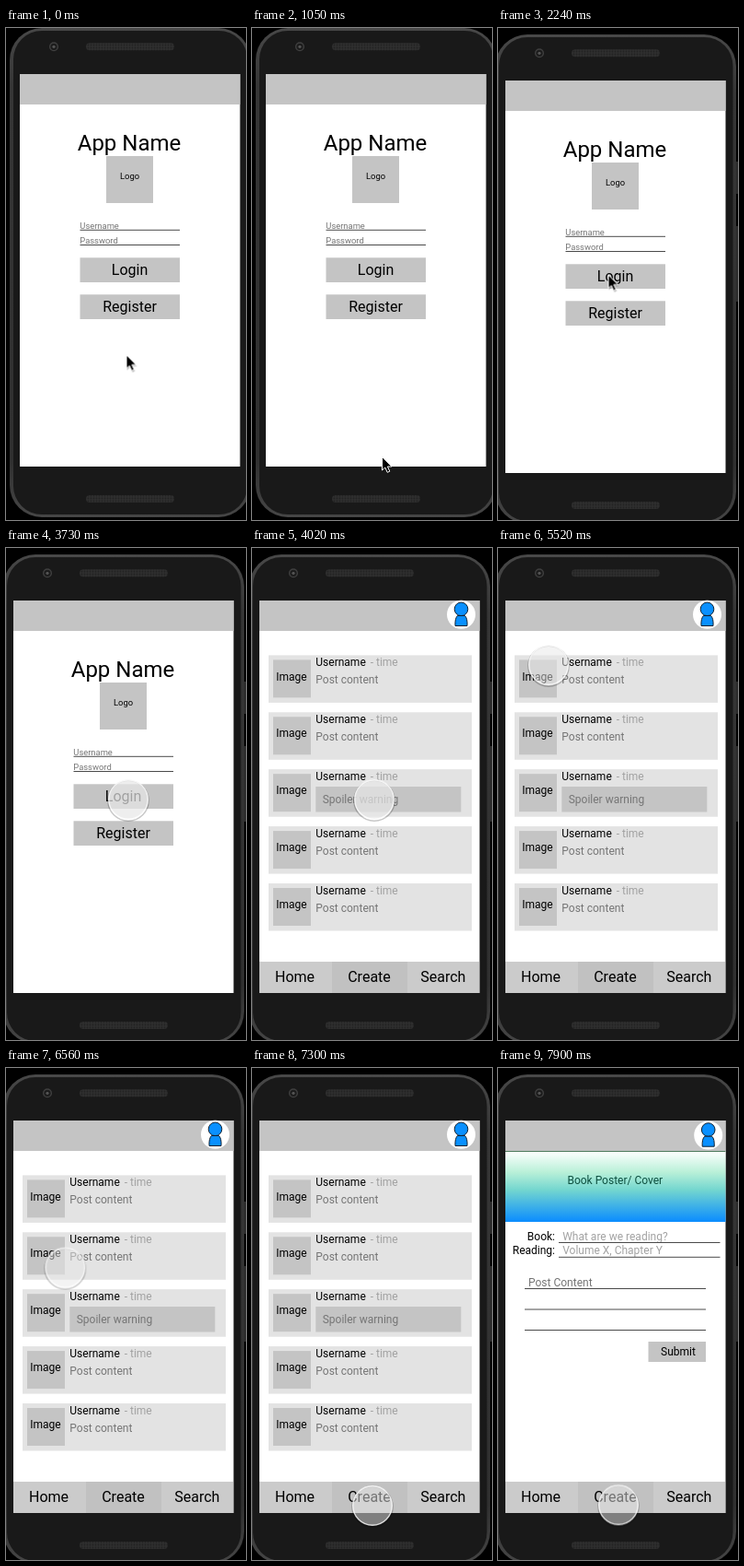
An HTML page that plays this animation: 261 px wide and 534 px high, repeating every 8 s.

```html
<!DOCTYPE html>
<html lang="en">
<head>
<meta charset="utf-8">
<title>App prototype</title>
<style>
  html, body { margin: 0; width: 100%; height: 100%; overflow: hidden; background: #000; }
  svg { display: block; width: 100%; height: 100%; }
  text { font-family: Roboto, Arial, sans-serif; font-size: 12px; fill: #000; }
  .title { font-size: 24px; }
  .big { font-size: 16px; }
  .small { font-size: 9.4px; }
  .mid { text-anchor: middle; }
  .end { text-anchor: end; }
  .soft { fill: #757575; }
  .pale { fill: #a2a2a2; }
  .box { fill: #c4c4c4; }
  .card { fill: #e3e3e3; }
  .rule { stroke: #4a4a4a; stroke-width: 1; }

  .stage, .page, .arrow, .touch, .glass { animation: 8s step-end infinite; }
  .stage { animation-name: scroll; }
  .login { animation-name: login; }
  .feed { animation-name: feed; }
  .create { animation-name: create; }
  .arrow { animation-name: arrow; }
  .touch { animation-name: touch; }
  .glass { animation-name: press; }

  @keyframes scroll {
    0% { transform: translate(7px, -7px); }
    28%, 100% { transform: none; }
  }
  @keyframes login {
    0% { visibility: visible; }
    50.25%, 100% { visibility: hidden; }
  }
  @keyframes feed {
    0% { visibility: hidden; }
    50.25% { visibility: visible; }
    93.125%, 100% { visibility: hidden; }
  }
  @keyframes create {
    0% { visibility: hidden; }
    93.125%, 100% { visibility: visible; }
  }
  @keyframes arrow {
    0% { visibility: visible; transform: translate(130.5px, 354.5px); }
    11.25% { transform: translate(130.5px, 354.5px); animation-timing-function: steps(2, start); }
    15% { transform: translate(141px, 465px); }
    28% { visibility: visible; transform: translate(119.5px, 267.5px); }
    37.375%, 100% { visibility: hidden; transform: translate(119.5px, 267.5px); }
  }
  @keyframes touch {
    0% { visibility: hidden; transform: translate(121px, 303px); }
    37.375% { visibility: visible; transform: translate(121px, 303px); animation-timing-function: steps(5); }
    46.6% { visibility: visible; transform: translate(133px, 273px); }
    63.375% { transform: translate(133px, 273px); animation-timing-function: steps(4, start); }
    70.8% { transform: translate(55px, 127px); animation-timing-function: steps(4, start); }
    78.3% { transform: translate(51px, 165px); }
    82% { transform: translate(51px, 165px); animation-timing-function: steps(6, start); }
    93% { transform: translate(131px, 475px); }
    98.75%, 100% { visibility: visible; transform: translate(131px, 474.3px); }
  }
  @keyframes press {
    0% { fill-opacity: .5; }
    46.6% { fill-opacity: .7; }
    63.375%, 100% { fill-opacity: .5; }
  }
</style>
</head>
<body>
<svg viewBox="0 0 261 534" preserveAspectRatio="none">
  <defs>
    <linearGradient id="rim" x2="0" y2="1">
      <stop stop-color="#484848"/>
      <stop offset=".12" stop-color="#363636"/>
      <stop offset=".88" stop-color="#303030"/>
      <stop offset="1" stop-color="#464646"/>
    </linearGradient>
    <linearGradient id="cover" x2="0" y2="1">
      <stop stop-color="#fff"/>
      <stop offset=".3" stop-color="#b9f0d8"/>
      <stop offset=".55" stop-color="#73d6cf"/>
      <stop offset="1" stop-color="#0a8cff"/>
    </linearGradient>
    <pattern id="mesh" width="3" height="3" patternUnits="userSpaceOnUse">
      <rect width="3" height="3" fill="#2e2e2e"/>
      <circle cx="1.5" cy="1.5" r=".9" fill="#222"/>
    </pattern>
    <g id="avatar">
      <circle r="15.5" fill="#fff"/>
      <g fill="#0a90ff" stroke="#102030">
        <circle cy="-6" r="7.3"/>
        <path d="M-4 1.2H4Q7 4 6.5 12.2H-6.5Q-7 4 -4 1.2Z"/>
      </g>
    </g>
    <g id="post">
      <rect class="card" width="221" height="51.5"/>
      <rect class="box" x="5" y="5" width="41" height="41"/>
      <text class="mid" x="25" y="27.2">Image</text>
      <text x="51.3" y="11.7">Username</text>
      <text class="pale" x="110.7" y="11.7">- time</text>
    </g>
    <g id="nav">
      <rect x="8" y="449" width="239" height="34" fill="#cbcbcb"/>
      <rect x="87" y="449" width="82" height="34" fill="#c1c1c1"/>
      <g class="mid">
        <text class="big" x="46.5" y="471">Home</text>
        <text class="big" x="127.5" y="471">Create</text>
        <text class="big" x="207.8" y="471">Search</text>
      </g>
    </g>
  </defs>

  <rect width="261" height="534"/>
  <g class="stage">
    <path d="M257 145h4v35h-4zM257 215h4v82h-4z" fill="#2b2b2b"/>
    <rect x="-3" y="7" width="262" height="531" rx="35" fill="url(#rim)"/>
    <rect x="1" y="10" width="254.5" height="525" rx="31" fill="#191919"/>
    <circle cx="45" cy="27.3" r="5" fill="#404040"/>
    <circle cx="45" cy="27.3" r="3.6" fill="#1c1c1c"/>
    <circle cx="45" cy="27.3" r="1.6" fill="#555"/>
    <rect x="80" y="23.3" width="96" height="8" rx="4" fill="url(#mesh)"/>
    <rect x="80" y="514" width="96" height="8" rx="4" fill="url(#mesh)"/>
    <rect x="8" y="57" width="239.5" height="426" fill="#fff"/>
    <rect class="box" x="8" y="57" width="239.5" height="33"/>

    <g class="page login">
      <text class="title mid" x="127" y="140">App Name</text>
      <rect class="box" x="102" y="146" width="51" height="51"/>
      <text class="small mid" x="127.5" y="171">Logo</text>
      <text class="small soft" x="73.3" y="224.8">Username</text>
      <text class="small soft" x="73.3" y="241.3">Password</text>
      <path class="rule" d="M73.5 226.3H182M73.5 242.5H182"/>
      <rect class="box" x="73.5" y="256.3" width="108.5" height="26.7"/>
      <text class="big mid" x="127.5" y="275">Login</text>
      <rect class="box" x="73.5" y="296.3" width="108.5" height="26.7"/>
      <text class="big mid" x="127.5" y="315">Register</text>
    </g>

    <g class="page feed">
      <use href="#avatar" x="227.5" y="72.3"/>
      <use href="#post" x="18" y="116.4"/>
      <use href="#post" x="18" y="178.3"/>
      <use href="#post" x="18" y="240.2"/>
      <use href="#post" x="18" y="302.1"/>
      <use href="#post" x="18" y="364"/>
      <g>
        <text class="soft" x="69.3" y="146.9">Post content</text>
        <text class="soft" x="69.3" y="208.8">Post content</text>
        <text class="soft" x="69.3" y="332.6">Post content</text>
        <text class="soft" x="69.3" y="394.5">Post content</text>
      </g>
      <rect class="box" x="69.3" y="259" width="158" height="27.5"/>
      <text class="soft" x="76.7" y="277">Spoiler warning</text>
      <use href="#nav"/>
    </g>

    <g class="page create">
      <use href="#avatar" x="228.7" y="73"/>
      <rect x="8" y="90" width="239.5" height="77" fill="url(#cover)"/>
      <path d="M8 90.5H247.5" stroke="#4d7a5c"/>
      <text class="mid" x="127.3" y="126" fill="#0d4f3f" style="fill:#0d4f3f">Book Poster/ Cover</text>
      <text class="end" x="62" y="187">Book:</text>
      <text class="end" x="62" y="202.3">Reading:</text>
      <text class="pale" x="70.2" y="187">What are we reading?</text>
      <text class="pale" x="70.2" y="202.3">Volume X, Chapter Y</text>
      <text class="soft" x="33" y="237">Post Content</text>
      <path class="rule" d="M66 189.5H241.5M66 205.3H241.5M29 239.5H226M29 262H226M29 284.5H226"/>
      <rect class="box" x="163.5" y="297" width="62.5" height="22"/>
      <text class="mid" x="196" y="312.3">Submit</text>
      <use href="#nav"/>
    </g>
  </g>

  <g class="arrow">
    <path d="M1 2V17L4.6 13.8L7 19.2L9.8 18L7.4 12.8H12Z" fill="#000" opacity=".25"/>
    <path d="M.5 .5V15L3.8 12L6.2 17.3L8.8 16.2L6.4 11H11Z" fill="#000" stroke="#fff"/>
  </g>
  <g class="touch">
    <circle cy="1.2" r="22" fill="none" stroke="#000" stroke-opacity=".22" stroke-width="1.6"/>
    <circle class="glass" r="21.3" fill="#e7e7e7" stroke="#fff" stroke-opacity=".8" stroke-width="1.4"/>
  </g>
</svg>
</body>
</html>
```
